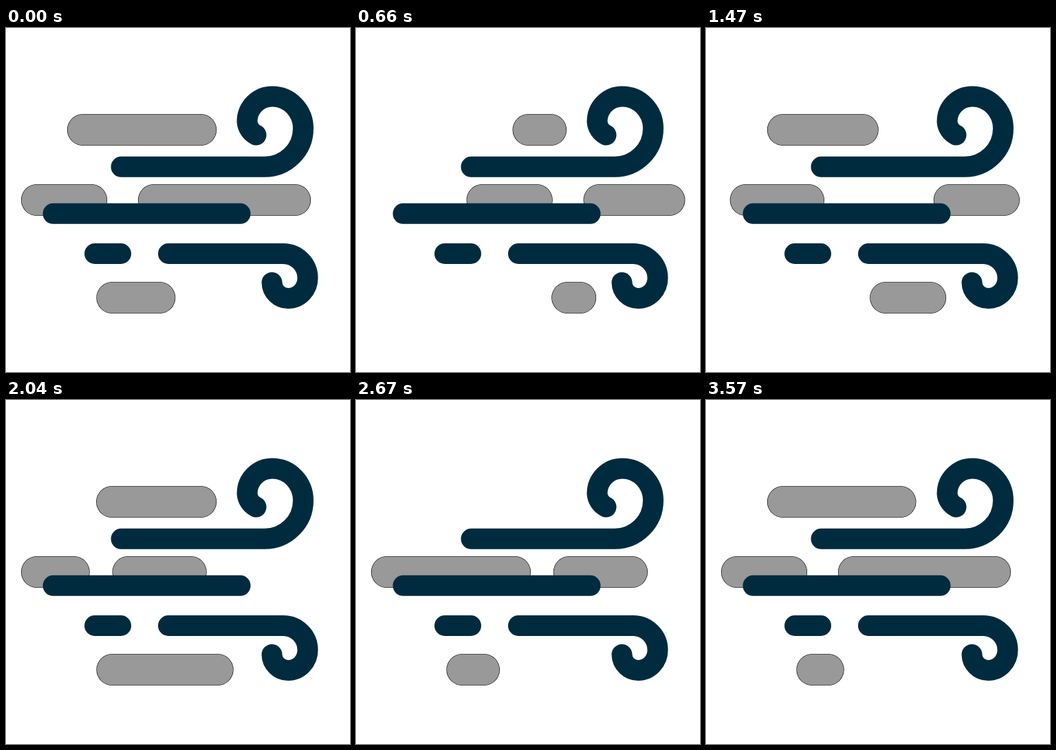
These frames come from a looping animation (500 by 500 pixels, 3630 ms). An HTML page:

```html
<!DOCTYPE html>
<html lang="en">
<head>
<meta charset="utf-8">
<title>Wind</title>
<style>
  html, body { margin: 0; width: 100%; height: 100%; overflow: hidden; background: #fff; }
  svg { display: block; width: 100vw; height: 100vh; }
  path { fill: none; stroke-linecap: round; }
  .edge { stroke: #000; stroke-width: 46.2; }
  .gust { stroke: #999; stroke-width: 45; }
  .wind { stroke: #002b3f; stroke-width: 30; }
</style>
</head>
<body>
<svg viewBox="0 0 500 500">
  <g id="gusts"></g>
  <g class="wind">
    <path d="M167.5 201.8H376A56 55.8 0 0 0 432 146A45 46.5 0 0 0 387 99.5A36.5 36.5 0 0 0 350.5 136A23.5 23.5 0 0 0 363.5 155.5"/>
    <path d="M68.5 269.8H340.5"/>
    <path d="M129 328H167"/>
    <path d="M236 328H403A35.5 35.5 0 0 1 438.5 363.5A28.5 29.5 0 0 1 410 393A23.5 23.5 0 0 1 386.5 370"/>
  </g>
</svg>
<script>
const LOOP = 3630, STEP = 30, LAST = 119;

// Dashes of each row slide right by `travel` over the loop.
const rows = [
  { y: 148, from: 112, to: 283, dash: "193.2", start: 0, travel: 750 },
  { y: 250, from: 45, to: 455.3, dash: "79 91 205", start: 0, travel: 750 },
  { y: 392, from: 154.5, to: 326, dash: "193.2", start: -124.5, travel: 1500 }
];

const gusts = document.getElementById("gusts");

function addLine(row, cls) {
  const line = document.createElementNS("http://www.w3.org/2000/svg", "path");
  line.setAttribute("class", cls);
  line.setAttribute("d", `M${row.from} ${row.y}H${row.to}`);
  line.setAttribute("stroke-dasharray", row.dash);
  gusts.appendChild(line);
  return line;
}

for (const row of rows) row.lines = ["edge", "gust"].map(cls => addLine(row, cls));

function draw(ms) {
  const p = Math.min(Math.floor((ms % LOOP) / STEP), LAST) / LAST;
  for (const row of rows) {
    const shift = row.start + row.travel * p;
    for (const line of row.lines) line.setAttribute("stroke-dashoffset", -shift);
  }
}

function tick(now) {
  draw(now);
  requestAnimationFrame(tick);
}

draw(0);
requestAnimationFrame(tick);
</script>
</body>
</html>
```
